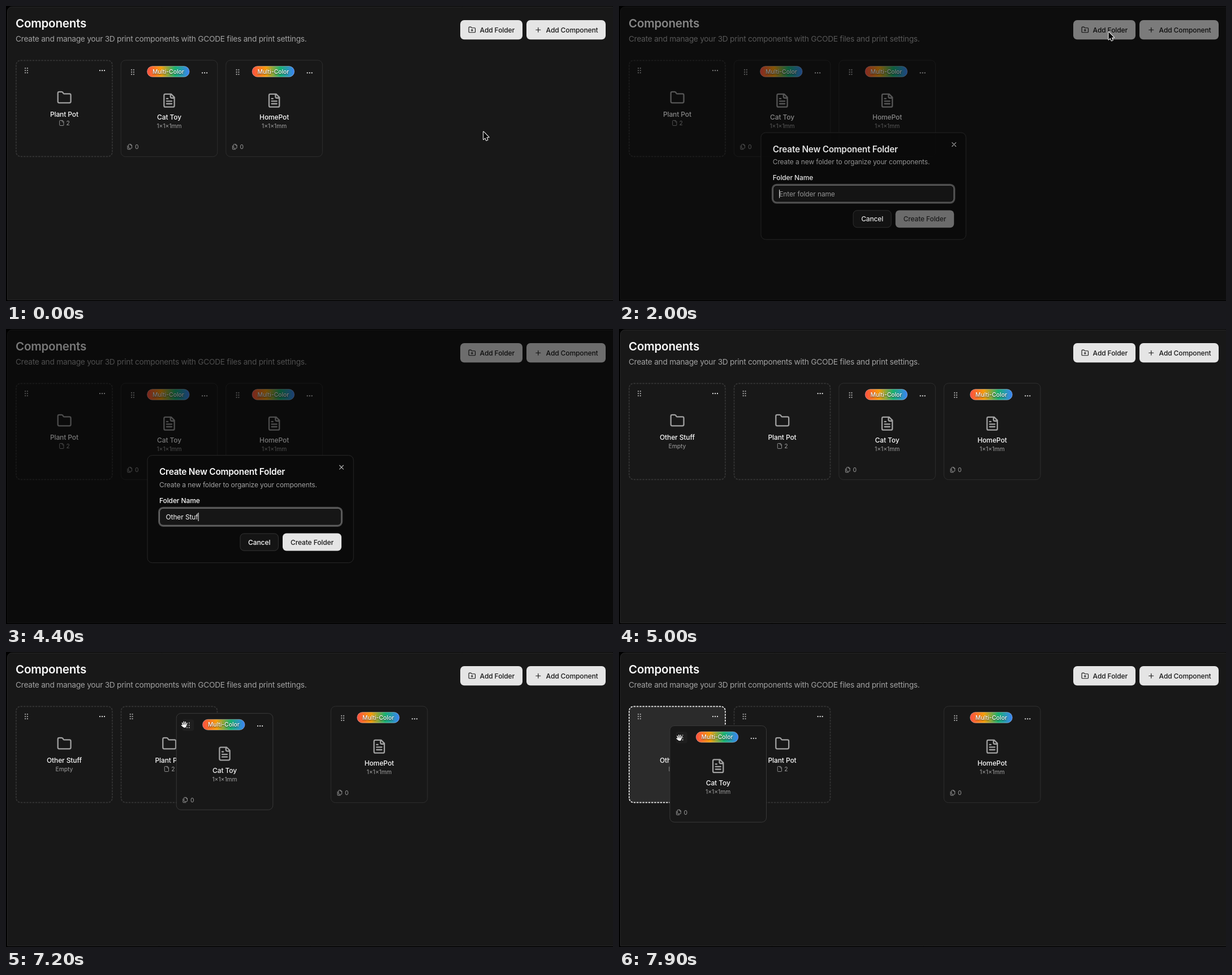
Recreate the animation shown at these times as an HTML page with a canvas. Size 1073 px wide and 522 px high, loop 8000 ms.

```html
<!DOCTYPE html>
<html lang="en">
<head>
<meta charset="utf-8">
<title>Components</title>
<style>
  html, body { margin: 0; width: 100%; height: 100%; overflow: hidden; background: #000; }
  canvas { display: block; width: 1073px; height: 522px; }
</style>
</head>
<body>
<canvas id="stage"></canvas>
<script>
const W = 1073, H = 522, LOOP = 8000, STEP = 100;
const OPEN = 1900, CLOSE = 4700, INSERT = 4800, GRAB = 6700, DRAG = 7000;
const CARD = 171.6, TOP = 95.5, PITCH = 185.6;
const MUTED = '#a1a1a1', LIGHT = '#fafafa', DARK = '#181818', BUTTON = '#e5e5e5';

const canvas = document.getElementById('stage');
const ctx = canvas.getContext('2d');
const dpr = window.devicePixelRatio || 1;
canvas.width = W * dpr;
canvas.height = H * dpr;

const clamp = v => Math.max(0, Math.min(1, v));
const smooth = u => u * u * (3 - 2 * u);
const easeOut = (u, k) => 1 - Math.pow(1 - u, k);
const mix = (a, b, u) => a + (b - a) * u;

// Icons on a 24-unit grid
const FOLDER = 'M20 20a2 2 0 0 0 2-2V8a2 2 0 0 0-2-2h-7.9a2 2 0 0 1-1.69-.9L9.6 3.9A2 2 0 0 0 7.93 3H4a2 2 0 0 0-2 2v13a2 2 0 0 0 2 2Z';
const FILE = 'M15 2H6a2 2 0 0 0-2 2v16a2 2 0 0 0 2 2h12a2 2 0 0 0 2-2V7ZM14 2v4a2 2 0 0 0 2 2h4';
const ICONS = {
  folder: FOLDER,
  folderPlus: FOLDER + 'M12 10v6M9 13h6',
  file: FILE,
  fileText: FILE + 'M10 9H8M16 13H8M16 17H8',
  files: 'M20 7h-3a2 2 0 0 1-2-2V2M9 18a2 2 0 0 1-2-2V4a2 2 0 0 1 2-2h7l4 4v10a2 2 0 0 1-2 2ZM3 7.6v12.8A1.6 1.6 0 0 0 4.6 22h9.8',
  plus: 'M5 12h14M12 5v14',
  close: 'M18 6 6 18M6 6l12 12'
};
for (const name in ICONS) ICONS[name] = new Path2D(ICONS[name]);

const ARROW = new Path2D('M0 0V13.4L3 10.6L5.1 15.3L7.3 14.4L5.3 9.8H9.5Z');
const HAND = new Path2D('M-2.7 1L-4 -3.4M-.8 0L-1.2 -5.3M1.3 0L1.8 -5M3 1L4.5 -3M-2.2 3.4L-5.2 1');
const PALM = new Path2D('M-2.8 .4H3.2L3 3L1.7 5H-1.3L-2.8 3Z');

function icon(name, cx, cy, size, color) {
  const s = size / 24;
  ctx.save();
  ctx.translate(cx - size / 2, cy - size / 2);
  ctx.scale(s, s);
  ctx.strokeStyle = color;
  ctx.lineWidth = 2;
  ctx.lineCap = ctx.lineJoin = 'round';
  ctx.stroke(ICONS[name]);
  ctx.restore();
}

function text(str, x, y, { size = 12, weight = 400, color = LIGHT, align = 'left', track = -0.009 } = {}) {
  ctx.font = `${weight} ${size}px Inter, sans-serif`;
  ctx.letterSpacing = `${size * track}px`;
  ctx.textAlign = align;
  ctx.fillStyle = color;
  ctx.fillText(str, x, y);
}

function box(x, y, w, h, r, fill, stroke, line = 1) {
  ctx.beginPath();
  ctx.roundRect(x, y, w, h, r);
  if (fill) { ctx.fillStyle = fill; ctx.fill(); }
  if (stroke) { ctx.strokeStyle = stroke; ctx.lineWidth = line; ctx.stroke(); }
}

function dots(cx, cy, xs, ys, color) {
  ctx.fillStyle = color;
  for (const dx of xs) for (const dy of ys) {
    ctx.beginPath();
    ctx.arc(cx + dx, cy + dy, 1.15, 0, 7);
    ctx.fill();
  }
}
const grip = (x, y) => dots(x, y, [-1.9, 1.9], [-4, 0, 4], MUTED);
const ellipsis = (x, y) => dots(x, y, [-4, 0, 4], [0], BUTTON);

function folderCard(x, y, name, count, over) {
  ctx.setLineDash([3.4, 1.8]);
  box(x + .8, y + .8, CARD - 1.6, CARD - 1.6, 8, over ? '#2b2b2b' : DARK, over ? '#f0f0f0' : '#353535', 1.7);
  ctx.setLineDash([]);
  const cx = x + CARD / 2;
  grip(x + 18.9, y + 18.7);
  ellipsis(x + 152.9, y + 18.7);
  icon('folder', cx + .2, y + 66.7, 27.4, MUTED);
  text(name, cx, y + 100.3, { weight: 500, align: 'center' });
  const small = { size: 10.3, color: MUTED, track: 0 };
  if (count) {
    icon('file', x + 81.2, y + 111.5, 10.8, MUTED);
    text(count, x + 89.5, y + 115.3, small);
  } else {
    text('Empty', cx, y + 115.3, { ...small, align: 'center' });
  }
}

function badge(x, y) {
  const g = ctx.createLinearGradient(x, 0, x + 75, 0);
  ['#ff4d42', '#f59e0b', '#18b172', '#3b82f6'].forEach((c, i) => g.addColorStop(i / 3, c));
  box(x + .3, y + .3, 74.6, 18.8, 9.4, g, 'rgba(255,255,255,.4)', .9);
  ctx.save();
  ctx.shadowColor = 'rgba(0,0,0,.8)';
  ctx.shadowBlur = 2 * dpr;
  ctx.shadowOffsetY = dpr;
  text('Multi-Color', x + 37.6, y + 13.5, { size: 10.3, weight: 500, color: '#fff', align: 'center', track: 0 });
  ctx.restore();
}

function partCard(x, y, name, { hover, gripHover, lifted } = {}) {
  const cx = x + CARD / 2;
  box(x + .5, y + .5, CARD - 1, CARD - 1, 8, hover ? '#1e1e1e' : DARK, lifted ? '#393939' : '#2e2e2e');
  if (gripHover) box(x + 11, y + 11, 20.5, 20.5, 4, lifted ? '#1f1f1f' : '#272727');
  grip(x + 21.2, y + 21.5);
  badge(x + 46.5, y + 10.8);
  ellipsis(x + 148.4, y + 22.8);
  icon('fileText', cx, y + 71.8, 27.4, MUTED);
  text(name, cx, y + 105.6, { weight: 500, align: 'center' });
  text('1×1×1mm', cx, y + 120.6, { size: 10.3, color: MUTED, align: 'center', track: 0 });
  icon('files', x + 16.2, y + 153.7, 10.8, MUTED);
  text('0', x + 25.2, y + 157.6, { size: 10.3, color: MUTED, track: 0 });
}

function button(x, w, label, name, hover) {
  box(x, 25, w, 34.3, 7, hover ? '#cfcfcf' : BUTTON);
  icon(name, x + 20.8, 42.2, 13.7, DARK);
  text(label, x + 34.6, 46.5, { weight: 500, color: DARK });
}

function dialog(t, p) {
  ctx.save();
  ctx.fillStyle = `rgba(0,0,0,${.52 * p})`;
  ctx.fillRect(0, 0, W, H);
  ctx.globalAlpha = p;
  const s = .95 + .05 * p, cx = 432, cy = 318.5;
  ctx.translate(cx, cy);
  ctx.scale(s, s);
  ctx.translate(-cx, -cy);

  box(250, 223.6, 364.2, 190, 8.5, '#0a0a0a', '#282828');
  icon('close', 593, 244.7, 13.7, '#b4b4b4');
  text('Create New Component Folder', 271, 258.2, { size: 15.43, weight: 600, track: -.016 });
  text('Create a new folder to organize your components.', 271, 280, { color: MUTED });
  text('Folder Name', 271, 308.4, { weight: 500 });

  box(270.3, 316, 323.6, 32.6, 7.5, null, '#505050', 2.6);
  box(271.5, 317.3, 321.2, 30, 6.5, '#161616', '#787878');
  const typed = 'Other Stuff'.slice(0, typedCount(t));
  text(typed || 'Enter folder name', 282.5, 337, { color: typed ? LIGHT : MUTED });
  const caretOn = typed || (t - 2000) % 1000 < 500;
  if (caretOn) {
    const end = typed ? ctx.measureText(typed).width : 0;
    ctx.fillStyle = LIGHT;
    ctx.fillRect(282.4 + end, 325, 1, 15);
  }

  box(414, 362, 67.4, 30.2, 6.8, '#141414', '#343434');
  text('Cancel', 447.7, 381.5, { weight: 500, align: 'center' });
  box(489, 361.6, 104, 31, 6.8, typed ? BUTTON : '#767676');
  text('Create Folder', 541, 381.5, { weight: 500, color: typed ? DARK : '#121212', align: 'center' });
  ctx.restore();
}

function typedCount(t) {
  if (t < 3200) return 0;
  if (t < 4000) return Math.min(6, Math.floor((t - 3100) / 100));
  if (t < 4200) return 7;
  return Math.min(11, 8 + Math.floor((t - 4200) / 100));
}

// Pointer moves: start, end, then start point, bend and end point
const MOVES = [
  [0, 900, 844, 222.5, 1058, 120, 862, 33],
  [900, 1300, 862, 33, 866, 36, 865.5, 46],
  [2000, 2700, 865.5, 46, 640, 150, 458.8, 326.3],
  [5200, 5500, 458.8, 326.3, 580, 280, 666, 204],
  [5600, 6200, 666, 204, 520, 130, 409, 106.5]
];

function pointer(t) {
  if (t >= 3200 && t < 5200) return null;
  if (t >= GRAB) {
    const e = easeOut(clamp((t - DRAG) / 900), 1.5);
    return { x: mix(411, 107, e), y: mix(118, 152, e), hand: true };
  }
  const [a, b, x0, y0, cx, cy, x1, y1] = MOVES.filter(m => m[0] <= t).pop();
  const u = smooth(clamp((t - a) / (b - a)));
  return {
    x: mix(mix(x0, cx, u), mix(cx, x1, u), u),
    y: mix(mix(y0, cy, u), mix(cy, y1, u), u)
  };
}

function drawPointer({ x, y, hand }) {
  ctx.save();
  ctx.translate(x, y);
  ctx.lineJoin = ctx.lineCap = 'round';
  if (hand) {
    for (const [color, finger, edge] of [['#000', 3.2, 1.6], ['#fff', 1.6, .2]]) {
      ctx.strokeStyle = ctx.fillStyle = color;
      ctx.lineWidth = finger;
      ctx.stroke(HAND);
      ctx.lineWidth = edge;
      ctx.stroke(PALM);
      ctx.fill(PALM);
    }
  } else {
    ctx.strokeStyle = '#fff';
    ctx.lineWidth = 2;
    ctx.stroke(ARROW);
    ctx.fillStyle = '#000';
    ctx.fill(ARROW);
  }
  ctx.restore();
}

function draw(t) {
  const shade = t < 3300 ? clamp((t - OPEN + 80) / 200) * (t >= OPEN) : 1 - clamp((t - CLOSE + 80) / 200) * (t >= CLOSE);
  const p = pointer(t);
  const within = (x, y, w, h) => p && !shade && p.x >= x && p.x <= x + w && p.y >= y && p.y <= y + h;

  ctx.setTransform(dpr, 0, 0, dpr, 0, 0);
  ctx.fillStyle = '#000';
  ctx.fillRect(0, 0, W, H);
  box(2.5, 1.5, W + 4, 518.5, [8, 8, 0, 0], DARK, '#2a2a2a');

  text('Components', 17, 38, { size: 20.57, weight: 600, track: -.011 });
  text('Create and manage your 3D print components with GCODE files and print settings.', 17, 63, { size: 13.71, color: MUTED, track: -.0185 });
  button(803, 110, 'Add Folder', 'folderPlus', within(803, 25, 110, 34));
  button(920, 140, 'Add Component', 'plus', within(920, 25, 140, 34));

  const dragging = t > DRAG;
  const u = clamp((t - DRAG) / 900);
  const lift = { x: mix(388.3, 89.4, easeOut(u, 1.38)), y: mix(TOP, 130, easeOut(u, 1.815)) };
  const aim = lift.x + CARD / 2;
  const target = !dragging || aim > 381 ? '' : aim > 196 ? 'Plant Pot' : 'Other Stuff';

  const cards = [['Plant Pot', '2'], ['Cat Toy'], ['HomePot']];
  if (t >= INSERT) cards.unshift(['Other Stuff', '']);
  cards.forEach(([name, count], i) => {
    const x = 17.1 + i * PITCH;
    if (count !== undefined) {
      folderCard(x, TOP, name, count, name === target);
    } else if (!(dragging && name === 'Cat Toy')) {
      partCard(x, TOP, name, {
        hover: within(x, TOP, CARD, CARD),
        gripHover: within(x + 10, TOP + 10, 22, 24)
      });
    }
  });
  if (dragging) partCard(lift.x, lift.y, 'Cat Toy', { lifted: true, gripHover: true });

  if (shade > 0) dialog(t, shade);
  if (p) drawPointer(p);
}

function tick() {
  const t = performance.now() % LOOP;
  draw(Math.floor(t / STEP) * STEP);
  requestAnimationFrame(tick);
}
tick();
</script>
</body>
</html>
```
